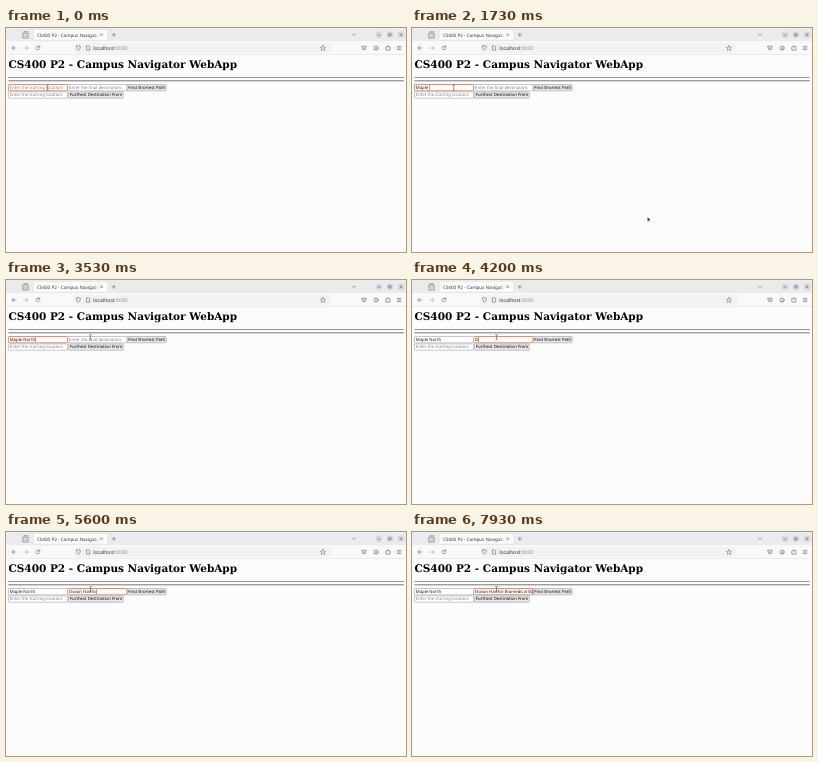
Recreate the animation shown at these times as an HTML page. Size 400x224 px, loop 8 s.

```html
<!DOCTYPE html>
<html lang="en">
<head>
<meta charset="utf-8">
<title>Campus Navigator</title>
<style>
  html, body { margin: 0; width: 100%; height: 100%; overflow: hidden; background: #fcfcfc; }
  svg { display: block; width: 400px; height: 224px; }
  text { font-family: "Noto Sans", "Open Sans", sans-serif; font-size: 4.27px; fill: #333;
         white-space: pre; text-rendering: geometricPrecision; }
  .title { font: bold 10.5px "DejaVu Serif", serif; fill: #000; }
  .icon { fill: none; stroke: #77777c; stroke-width: .7; stroke-linecap: round; stroke-linejoin: round; }
  .box { fill: #fff; stroke: #a2a2a6; stroke-width: .6; }
  .box.focus { stroke: #d08a70; stroke-width: .9; }
  .button { fill: #e8e8ea; stroke: #a0a0a4; stroke-width: .6; }
  .button.hover { fill: #d6d6da; }
  .label { fill: #1c1c1c; stroke: #1c1c1c; stroke-width: .04; }
  .hint { fill: #808084; }
  .typed { fill: #1c1c1c; }
</style>
</head>
<body>
<svg viewBox="0 0 400 224">
  <defs>
    <linearGradient id="fade">
      <stop offset="0" stop-color="#fcfcfc" stop-opacity="0"/>
      <stop offset="1" stop-color="#fcfcfc"/>
    </linearGradient>
    <clipPath id="inner"><rect x="62.4" y="56" width="58" height="8"/></clipPath>
    <clipPath id="tab"><rect x="28" y="0" width="65" height="14"/></clipPath>
  </defs>

  <rect width="400" height="224" fill="#fcfcfc"/>

  <!-- tab strip -->
  <rect width="400" height="13.5" fill="#ebebed"/>
  <rect x="27.5" y="1.5" width="74" height="10.6" rx="1.4" fill="#fcfcfc" stroke="#dcdce0" stroke-width=".4"/>
  <text x="30.9" y="8.5" style="font-size:4.6px" clip-path="url(#tab)">CS400 P2 - Campus Navigator</text>
  <rect x="88" y="2.5" width="5" height="9" fill="url(#fade)"/>
  <g fill="#d9d9dc">
    <circle cx="373" cy="6.8" r="3.4"/>
    <circle cx="384" cy="6.8" r="3.4"/>
    <circle cx="395" cy="6.8" r="3.4"/>
  </g>
  <g class="icon">
    <path d="M17.2 5.2h5v4.8h-5zM18 3.8h3.4M18.7 7.8q1 1.2 2 0"/>
    <path d="M94.5 5.6l2.2 2.2m0-2.2l-2.2 2.2M106.3 6.8h3m-1.5-1.5v3"/>
    <path d="M346.5 6l1.5 1.5 1.5-1.5"/>
    <path d="M371.8 7.2h2.4M382.9 5.7h2.2v2.2h-2.2zM393.9 5.7l2.2 2.2m0-2.2l-2.2 2.2"/>
  </g>

  <!-- toolbar -->
  <rect y="13.3" width="400" height="13" fill="#f9f9fa"/>
  <rect x="68" y="15" width="257" height="10.2" rx="1.3" fill="#f2f2f4"/>
  <path d="M0 26.5h400" stroke="#dadade" stroke-width=".5"/>
  <g class="icon">
    <path d="M10 20H6m1.8-1.9L5.9 20l1.9 1.9"/>
    <path d="M18 20h4m-1.8-1.9l1.9 1.9-1.9 1.9" stroke="#b5b5ba"/>
    <path d="M33.4 18.8a1.9 1.9 0 1 0 .3 1.9M33.8 17.6v1.5h-1.5"/>
    <path d="M72.4 17.6l2 .7q0 3-2 4.1-2-1.1-2-4.1z"/>
    <path d="M80.8 17.9h2.1l.8.9v3.3h-2.9z"/>
    <path d="M317 17.5l.8 1.7 1.8.2-1.3 1.2.4 1.8-1.7-.9-1.7.9.4-1.8-1.3-1.2 1.8-.2z" stroke-width=".6"/>
    <path d="M356 18.2h4v1.6a2 2 0 0 1-4 0zM357 19.6l1 .9 1-.9"/>
    <circle cx="370" cy="20" r="2.1"/>
    <path d="M368.8 21.4q1.2-1.3 2.4 0M370 19.1v.1"/>
    <path d="M380.2 18.8h1.2v-.9h1.2v.9h1.3v3.3h-3.7z"/>
    <path d="M391.3 18.4h3.6M391.3 20h3.6M391.3 21.6h3.6"/>
  </g>
  <text x="87.2" y="21.9" style="font-size:5.1px">localhost<tspan fill="#99999e">:8080</tspan></text>

  <!-- page -->
  <text class="title" x="2.4" y="40.3">CS400 P2 - Campus Navigator WebApp</text>
  <path d="M2.4 49.5h395.4" stroke="#777" stroke-width=".8"/>
  <path d="M2.4 52.8h395.4" stroke="#555" stroke-width=".8"/>

  <rect class="box" x="2.4" y="63.9" width="59.2" height="6.3" rx=".7"/>
  <text class="hint" x="3.8" y="68.4">Enter the starting location:</text>
  <rect class="button" id="far" x="62.3" y="63.9" width="55" height="6.3" rx=".8"/>
  <text class="label" x="63.8" y="68.4">Furthest Destination From</text>
  <rect class="button" x="120.9" y="56.5" width="39.3" height="6.3" rx=".8"/>
  <text class="label" x="122.3" y="61.1">Find Shortest Path</text>

  <g id="fields"></g>

  <path id="arrow" d="M235.5 189v4.2l1-.8.6 1.3.7-.3-.6-1.3h1.3z" fill="#222" stroke="#fff" stroke-width=".2"/>
  <path id="beam" d="M-1.2-2.7Q0-2.7 0-2V2Q0 2.7-1.2 2.7M1.2-2.7Q0-2.7 0-2M0 2Q0 2.7 1.2 2.7"
        fill="none" stroke="#555" stroke-width=".6"/>
</svg>
<script>
  const LOOP = 8000;
  const SWITCH = 3670;
  const $ = id => document.getElementById(id);

  function add(parent, tag, attrs) {
    const node = document.createElementNS('http://www.w3.org/2000/svg', tag);
    for (const key in attrs) node.setAttribute(key, attrs[key]);
    return parent.appendChild(node);
  }

  // times[i] is the moment the character at index i is typed
  function makeField(x, hint, value, times, from, to) {
    const root = $('fields');
    const box = add(root, 'rect', { x: x - 1.4, y: 56.5, width: 59.2, height: 6.3, rx: .7 });
    const clip = x > 60 ? { 'clip-path': 'url(#inner)' } : {};
    const text = add(root, 'text', { x, y: 61.1, ...clip });
    const caret = add(root, 'rect', { y: 57.3, width: .45, height: 4.7, fill: '#222' });
    return t => {
      const count = times.filter(at => at <= t).length;
      const active = t >= from && t < to;
      box.setAttribute('class', active ? 'box focus' : 'box');
      text.setAttribute('class', count ? 'typed' : 'hint');
      text.textContent = count ? value.slice(0, count) : hint;
      const end = x + (count ? text.getComputedTextLength() : 0);
      caret.setAttribute('x', Math.min(end + .1, x + 56.8));
      caret.style.display = active && (count || from) ? '' : 'none';
    };
  }

  const fields = [
    makeField(63.1, 'Enter the final destination:', 'Dovan Hall for Biomedical St', [
      4070, 4270, 4470, 4600, 4800,
      4930, 5070, 5130, 5200, 5330, 5470, 5530, 5600, 5730,
      6070, 6200, 6270, 6330, 6400, 6530,
      7270, 7330, 7470, 7530, 7670, 7730, 7870, 7930
    ], SWITCH, LOOP),
    makeField(3.8, 'Enter the starting location:', 'Maple North', [
      670, 1070, 1200, 1470, 1600, 1730, 2330, 2800, 2930, 3070, 3070
    ], 0, SWITCH)
  ];

  // time, x, y of the text pointer
  const path = [[0, 41.6, 59.6], [3130, 41.6, 59.6], [3270, 62, 64.5], [3400, 78, 61], [3530, 84.5, 57.2], [LOOP, 84.5, 57.2]];

  function pointer(t) {
    const i = path.findIndex(p => p[0] > t);
    const [a, b] = [path[i - 1], path[i]];
    const k = (t - a[0]) / (b[0] - a[0]);
    return [a[1] + (b[1] - a[1]) * k, a[2] + (b[2] - a[2]) * k];
  }

  function draw(t) {
    fields.forEach(show => show(t));
    const [x, y] = pointer(t);
    $('beam').setAttribute('transform', `translate(${x} ${y})`);
    $('far').classList.toggle('hover', x > 62.3 && y > 63.9);
    $('arrow').style.display = t >= 130 && t < 1930 ? '' : 'none';
  }

  const start = performance.now();
  function tick() {
    draw((performance.now() - start) % LOOP);
    requestAnimationFrame(tick);
  }
  tick();
</script>
</body>
</html>
```
